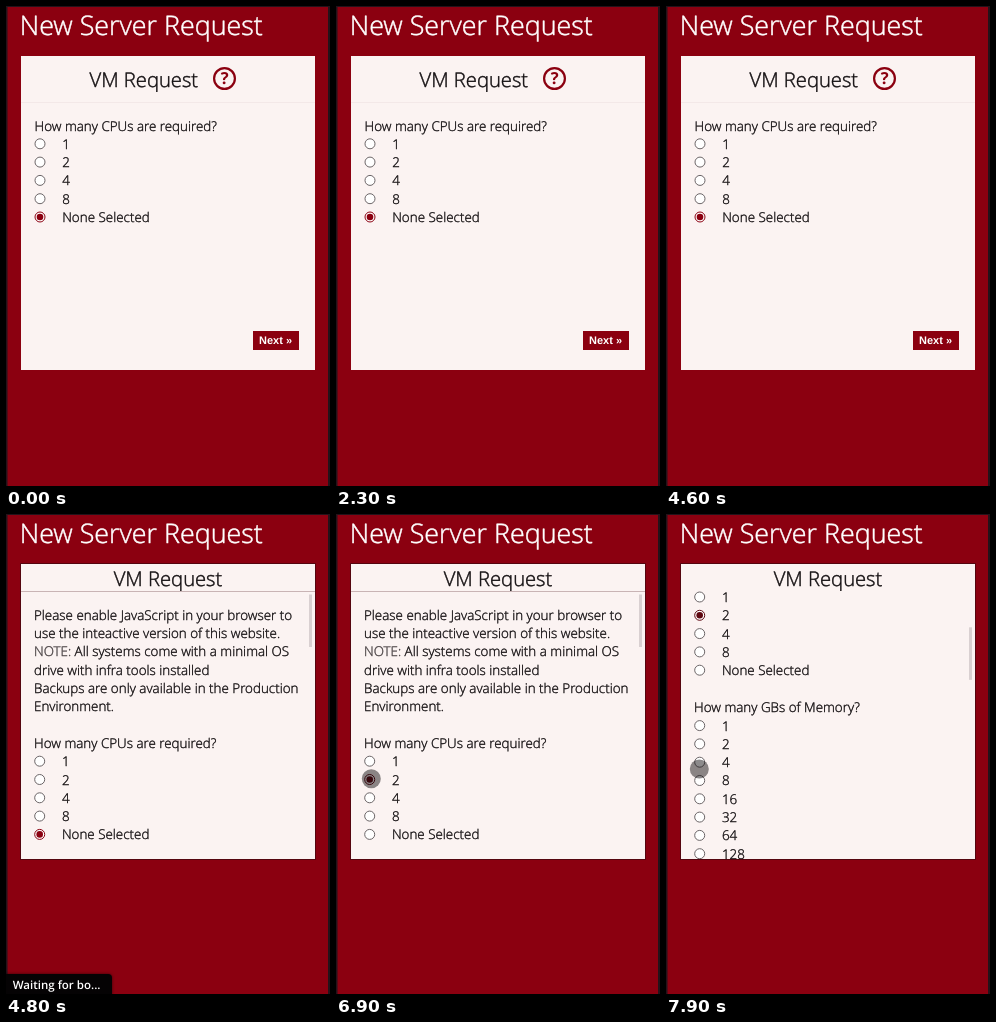
An HTML page with a canvas that plays this animation: 324x480 px, repeating every 8000 ms.

```html
<!DOCTYPE html>
<html lang="en">
<head>
<meta charset="utf-8">
<title>New Server Request</title>
<style>
html, body { margin: 0; width: 100%; height: 100%; overflow: hidden; background: #8b0010; }
canvas { display: block; width: 324px; height: 480px; }
</style>
</head>
<body>
<canvas id="stage"></canvas>
<script>
const W = 324, H = 480, LOOP = 8000, STEP = 100;
const RED = '#8b0010', PAPER = '#fbf3f2', INK = '#151113', EDGE = '#24131a';
const LIGHT = '"Open Sans", "Noto Sans", sans-serif';
const LINE = 18.3, BODY = 13.42;

const canvas = document.getElementById('stage');
const ratio = window.devicePixelRatio || 1;
canvas.width = W * ratio;
canvas.height = H * ratio;
const ctx = canvas.getContext('2d');
ctx.scale(ratio, ratio);
ctx.textRendering = 'geometricPrecision';
ctx.lineJoin = 'round';

function rect(x, y, w, h, color) {
  ctx.fillStyle = color;
  ctx.fillRect(x, y, w, h);
}

// Light text gets a hairline outline, like soft font smoothing.
function text(str, x, y, size = BODY, color = INK, weight = 300, family = LIGHT) {
  ctx.font = `${weight} ${size}px ${family}`;
  ctx.fillStyle = color;
  ctx.fillText(str, x, y);
  if (weight > 300) return;
  ctx.strokeStyle = color;
  ctx.lineWidth = 0.2 + size * 0.012;
  ctx.strokeText(str, x, y);
}

function disc(x, y, r, color) {
  ctx.beginPath();
  ctx.arc(x, y, r, 0, Math.PI * 2);
  ctx.fillStyle = color;
  ctx.fill();
}

function ring(x, y, r, color, width) {
  ctx.beginPath();
  ctx.arc(x, y, r, 0, Math.PI * 2);
  ctx.strokeStyle = color;
  ctx.lineWidth = width;
  ctx.stroke();
}

function radio(x, y, on, color) {
  disc(x, y, 5, '#fff');
  ring(x, y, 5, on ? color : '#6b6567', 1);
  if (on) disc(x, y, 3.3, color);
}

function options(labels, x, y, chosen, color) {
  labels.forEach((label, i) => {
    const cy = y + i * LINE;
    radio(x, cy, i === chosen, color);
    text(label, x + 22.2, cy + 5);
  });
}

// Piecewise linear value from [time, value] points.
function track(points, t) {
  let [t0, v0] = points[0];
  for (const [t1, v1] of points) {
    if (t < t1) return t <= t0 ? v0 : v0 + (v1 - v0) * (t - t0) / (t1 - t0);
    t0 = t1;
    v0 = v1;
  }
  return v0;
}

const CPUS = ['1', '2', '4', '8', 'None Selected'];
const MEMORY = ['1', '2', '4', '8', '16', '32', '64', '128', '256'];
const INTRO = [
  'Please enable JavaScript in your browser to',
  'use the inteactive version of this website.',
  '',
  'drive with infra tools installed',
  'Backups are only available in the Production',
  'Environment.'
];

const LOAD = 4700, LOADED = 5100, TOUCH = 6200, PICK = 6400, FLICK = 7200;
const TOUCH_X = [[TOUCH, -10], [PICK, 35.3], [FLICK, 35.3], [7500, 57.3], [7900, 33.3]];
const TOUCH_Y = [[FLICK, 264.7], [7500, 270], [7900, 255]];

function scrollAt(t) {
  return t < FLICK ? 0 : 184 * (1 - Math.exp((FLICK - t) / 314));
}

function frame() {
  rect(0, 0, W, H, RED);
  rect(0, 0, 1.5, H, EDGE);
  rect(W - 2, 0, 2, H, EDGE);
  rect(0, 0, W, 1, EDGE);
  text('New Server Request', 13.8, 28.5, 26.85, '#fff');
}

function wizard() {
  rect(15, 50, 294, 314, PAPER);
  rect(15, 96, 294, 1, '#f3e8e8');
  text('VM Request', 83.5, 81, 20.2);
  ring(218.5, 72.5, 10.4, RED, 2.2);
  ctx.textAlign = 'center';
  text('?', 218.7, 78.3, 16.5, RED, 700);
  ctx.textAlign = 'left';
  text('How many CPUs are required?', 28.5, 124.7);
  options(CPUS, 34, 137.8, 4, RED);
  rect(247, 325, 46, 19, RED);
  text('Next »', 253, 338.3, 11, '#fff', 700, '"Liberation Sans", Arial, sans-serif');
}

function form(t) {
  const scroll = scrollAt(t);
  const picked = t >= PICK;
  rect(15, 50, 294, 295, PAPER);

  ctx.save();
  ctx.beginPath();
  ctx.rect(15, 77, 294, 268);
  ctx.clip();
  ctx.translate(0, -scroll);
  rect(15, 77, 294, 1, '#c9b4b5');
  INTRO.forEach((line, i) => text(line, 28, 105.8 + i * LINE));
  const noteY = 105.8 + 2 * LINE;
  text('NOTE:', 28, noteY, BODY, '#4c4547');
  const noteW = ctx.measureText('NOTE: ').width;
  text('All systems come with a minimal OS', 28 + noteW, noteY);
  text('How many CPUs are required?', 28, 233.9);
  options(CPUS, 33.7, 247.2, picked ? 1 : 4, picked ? '#5e0710' : RED);
  text('How many GBs of Memory?', 28, 362);
  options(MEMORY, 33.7, 375.8, -1, RED);
  ctx.restore();

  ctx.strokeStyle = 'rgba(40,10,16,0.55)';
  ctx.lineWidth = 1;
  ctx.strokeRect(14.5, 49.5, 295, 296);

  ctx.textAlign = 'center';
  text('VM Request', 162, 72, 20.2);
  ctx.textAlign = 'left';
  rect(303, 80.5 + scroll * 0.2, 3, 52.5, '#d9d0d1');
  if (t >= TOUCH) disc(track(TOUCH_X, t), track(TOUCH_Y, t), 9.5, 'rgba(10,6,8,0.47)');
}

function status() {
  ctx.save();
  ctx.shadowColor = 'rgba(0,0,0,0.6)';
  ctx.shadowBlur = 3 * ratio;
  ctx.beginPath();
  ctx.roundRect(-6, 460, 112, 26, 4);
  ctx.fillStyle = '#050304';
  ctx.fill();
  ctx.restore();
  text('Waiting for bo...', 6.7, 474.6, 11.5, '#fff', 600);
}

function draw(now) {
  const t = Math.floor((now % LOOP) / STEP) * STEP;
  frame();
  if (t < LOAD) wizard();
  else form(t);
  if (t >= LOAD && t < LOADED) status();
}

const start = performance.now();
function tick() {
  draw(performance.now() - start);
  requestAnimationFrame(tick);
}
tick();
</script>
</body>
</html>
```
